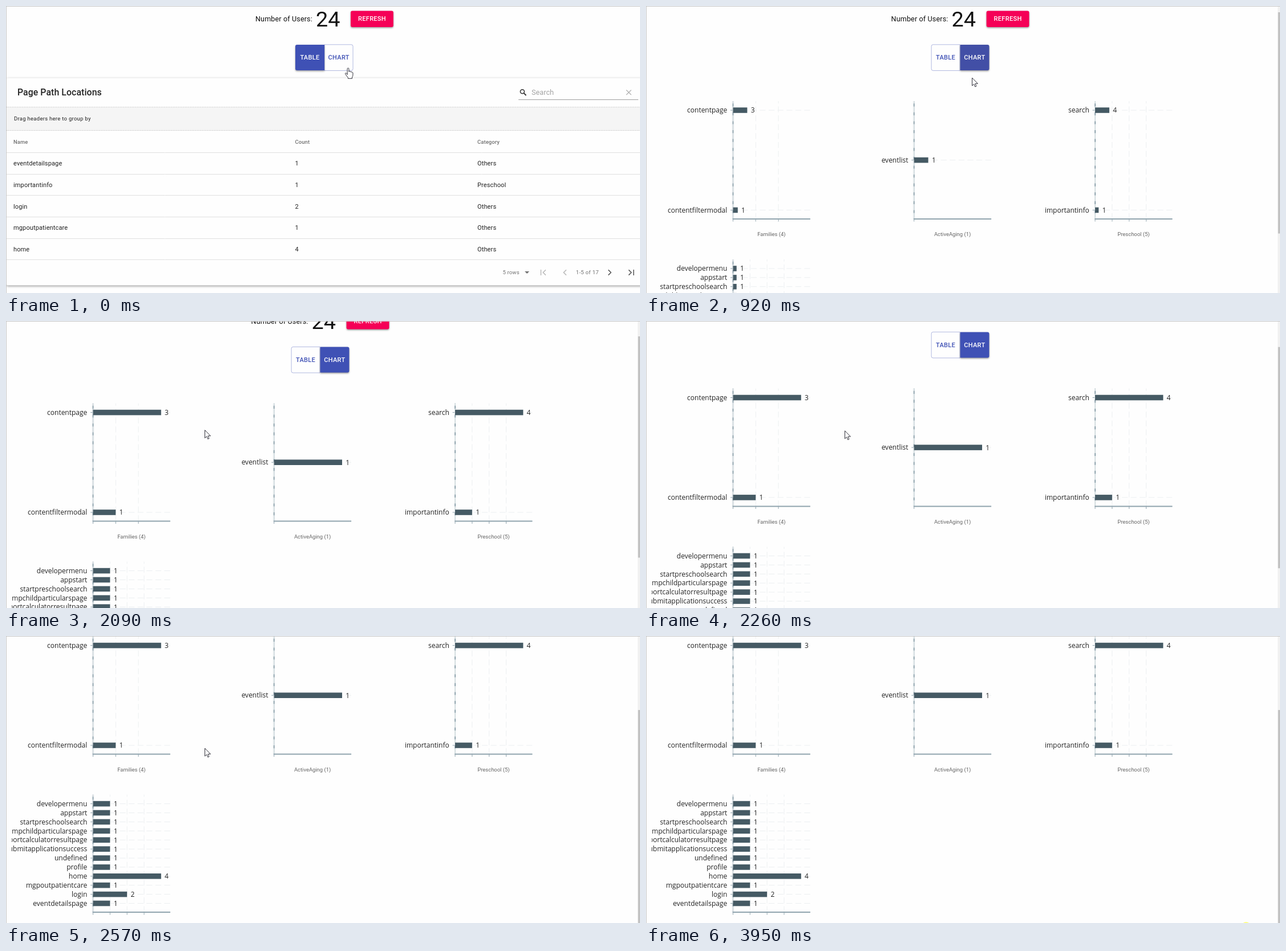
Animation, 1111 px wide and 504 px high, one loop 4030 ms. Source, as an HTML page with a canvas:

```html
<!DOCTYPE html>
<html lang="en">
<head>
<meta charset="utf-8">
<title>Page statistics</title>
<style>
html, body { margin: 0; width: 100%; height: 100%; overflow: hidden; background: #fefefe; }
canvas { display: block; width: 1111px; height: 504px; }
</style>
</head>
<body>
<canvas id="stage"></canvas>
<script>
const W = 1111, H = 504, LOOP = 4030;
const canvas = document.getElementById('stage');
const ctx = canvas.getContext('2d');
const ratio = window.devicePixelRatio || 1;
canvas.width = W * ratio;
canvas.height = H * ratio;

const INDIGO = '#3f51b5', SLATE = '#455a64', AXIS = '#90a4ae', GRID = '#eceff1';
const INK = 'rgba(0,0,0,.87)', SOFT = 'rgba(0,0,0,.56)', FAINT = 'rgba(0,0,0,.27)';
const UI = 'Roboto, sans-serif', LABEL = '"Open Sans", "Noto Sans", sans-serif';

const TICKS = [0, 80, 150, 230, 300, 380, 450, 530, 600, 690, 770, 840, 920, 1010, 1080, 1150,
  1230, 1310, 1390, 1460, 1540, 1620, 2090, 2180, 2280, 2390, 2490, 2570,
  2710, 2790, 2870, 2950, 3030, 3100, 3180, 3260, 3340, 3410, 3490, 3950];

const CURSOR = [[0, 599.5, 109], [80, 598, 107], [300, 588, 97], [600, 586, 98], [690, 584, 103],
  [920, 571, 126], [1010, 562, 130], [1150, 505, 151], [1390, 390, 181], [1620, 348, 190],
  [2090, 348, 191.5], [2390, 348, 195.5], [2570, 348, 197], [2640, 348, 197],
  [2870, 376, 208], [3030, 456.5, 236.5], [3180, 801, 335], [3260, 882, 384], [3410, 968, 435]];
const SCROLL = [[2010, 0], [2090, 22.4], [2390, 109.4], [2570, 166.4]];
const CHART_FILL = [[690, 48, 63, 159], [920, 66, 79, 166], [1230, 63, 81, 181]];

const ROWS = [['eventdetailspage', 1, 'Others'], ['importantinfo', 1, 'Preschool'], ['login', 2, 'Others'],
  ['mgpoutpatientcare', 1, 'Others'], ['home', 4, 'Others']];

const CHARTS = [
  { x: 152.5, top: 167, base: 374, max: 3, ticks: 3, name: 'Families (4)',
    bars: [['contentpage', 3], ['contentfiltermodal', 1]], first: 183, gap: 175.4 },
  { x: 469.7, top: 167, base: 374, max: 1, ticks: 1, name: 'ActiveAging (1)',
    bars: [['eventlist', 1]], first: 270.6, gap: 0 },
  { x: 787, top: 167, base: 374, max: 4, ticks: 4, name: 'Preschool (5)',
    bars: [['search', 4], ['importantinfo', 1]], first: 183, gap: 175.4 },
  { x: 152.5, top: 445, base: 651.5, max: 4, ticks: 4, name: 'Others (15)',
    bars: [['developermenu', 1], ['appstart', 1], ['startpreschoolsearch', 1],
      ['mmpchildparticularspage', 1], ['supportcalculatorresultpage', 1],
      ['submitapplicationsuccess', 1], ['undefined', 1], ['profile', 1], ['home', 4],
      ['mgpoutpatientcare', 1], ['login', 2], ['eventdetailspage', 1]], first: 461, gap: 15.9 }
];

const clamp = v => Math.max(0, Math.min(1, v));
const quadInOut = u => u < .5 ? 2 * u * u : 1 - 2 * (1 - u) * (1 - u);

function track(keys, t) {
  let i = 0;
  while (i < keys.length - 2 && t > keys[i + 1][0]) i++;
  const a = keys[i], b = keys[i + 1], u = clamp((t - a[0]) / (b[0] - a[0]));
  return a.slice(1).map((v, k) => v + (b[k + 1] - v) * u);
}

function text(s, x, y, size, color = INK, o = {}) {
  ctx.font = `${o.weight || 400} ${size}px ${o.font || UI}`;
  ctx.letterSpacing = (o.space || 0) * size + 'px';
  ctx.textAlign = o.align || 'left';
  ctx.fillStyle = color;
  ctx.fillText(s, x, y);
}

function rect(x, y, w, h, color) {
  ctx.fillStyle = color;
  ctx.fillRect(x, y, w, h);
}

function line(pts, color, width = 1, dash = []) {
  ctx.beginPath();
  pts.forEach(([x, y]) => ctx.lineTo(x, y));
  ctx.setLineDash(dash);
  ctx.strokeStyle = color;
  ctx.lineWidth = width;
  ctx.stroke();
  ctx.setLineDash([]);
}

function box(x, y, w, h, r) {
  ctx.beginPath();
  ctx.roundRect(x, y, w, h, r);
}

function raised(x, y, w, h, r, color, blur = 3) {
  ctx.save();
  ctx.shadowColor = 'rgba(0,0,0,.4)';
  ctx.shadowBlur = blur * ratio;
  ctx.shadowOffsetY = 1.5 * ratio;
  box(x, y, w, h, r);
  ctx.fillStyle = color;
  ctx.fill();
  ctx.restore();
}

function outlined(x, r) {
  box(x + .5, 67.8, 50, 45.6, r);
  ctx.fillStyle = '#fefefe';
  ctx.fill();
  ctx.strokeStyle = 'rgba(63,81,181,.5)';
  ctx.lineWidth = .8;
  ctx.stroke();
}

function header(t, chart) {
  const dx = chart ? -7.4 : 0;
  const left = [3, 0, 0, 3], right = [0, 3, 3, 0];
  ctx.save();
  ctx.translate(dx, 0);
  text('Number of Users:', 437, 27, 12.6, '#111', { space: .0094 });
  text('24', 543, 36, 37.8, '#111');
  raised(604, 8.5, 74.8, 28.5, 3, '#f50057');
  const cap = { weight: 500, space: .0286, align: 'center' };
  text('REFRESH', 641.5, 26.4, 11.02, '#fff', cap);
  if (chart) {
    outlined(507, left);
    raised(558, 68, 50.8, 45, right, `rgb(${track(CHART_FILL, t).map(Math.round)})`);
  } else {
    outlined(557.5, right);
    press(t);
    raised(507, 68, 51, 45, left, INDIGO);
  }
  text('TABLE', 532.5, 94.2, 11.02, chart ? INDIGO : '#fff', cap);
  text('CHART', 583.2, 94.2, 11.02, chart ? '#fff' : INDIGO, cap);
  ctx.restore();
}

// Hover tint and ripple on the outlined button.
function press(t) {
  ctx.save();
  box(558, 68, 50, 45, [0, 3, 3, 0]);
  ctx.clip();
  rect(558, 68, 50, 45, `rgba(63,81,181,${.05 * clamp(t / 300)})`);
  const u = clamp((t - 480) / 160);
  if (u > 0) {
    ctx.beginPath();
    ctx.arc(586, 98, 12 + 36 * u, 0, 7);
    ctx.fillStyle = `rgba(63,81,181,${.22 * u})`;
    ctx.fill();
  }
  ctx.restore();
}

function chevron(x, y, dir, color) {
  line([[x - 2.3 * dir, y - 4.6], [x + 2.3 * dir, y], [x - 2.3 * dir, y + 4.6]], color, 1.5);
}

function table() {
  raised(.5, 126.5, 1115, 364, 3, '#fefefe', 4);
  text('Page Path Locations', 20, 157.3, 15.74, INK, { weight: 500, space: .0075 });

  ctx.beginPath();
  ctx.arc(904.8, 150.3, 3.5, 0, 7);
  ctx.strokeStyle = '#333';
  ctx.lineWidth = 1.5;
  ctx.stroke();
  line([[907.4, 152.9], [911.4, 157]], '#333', 1.9);
  text('Search', 921, 156.3, 12.6, '#a3a3a3', { space: .005 });
  line([[1087, 147.5], [1095.6, 156]], '#b0b0b0', 1.2);
  line([[1095.6, 147.5], [1087, 156]], '#b0b0b0', 1.2);
  line([[898, 164.5], [1108, 164.5]], '#949494', .9);

  rect(1, 178, W, 41, '#f5f5f5');
  for (const y of [177.5, 218.5]) line([[1, y], [W, y]], '#cfcfcf', 1, [2, 1]);
  text('Drag headers here to group by', 14, 201, 9.44, INK, { space: .0333 });

  const cols = [13, 506.5, 826];
  ['Name', 'Count', 'Category'].forEach((s, i) =>
    text(s, cols[i], 241.5, 9.44, SOFT, { weight: 500, space: .0107 }));
  line([[1, 257.5], [W, 257.5]], '#e0e0e0');
  ROWS.forEach((row, r) => {
    const y = 276.4 + r * 37.6;
    row.forEach((s, i) => text(s, cols[i], y + 3.9, 11.02, INK, { space: .0107 }));
    const edge = Math.floor(y + 18.8) + .5;
    line([[1, edge], [W, edge]], '#e0e0e0');
  });

  text('5 rows', 870.5, 471.3, 9.44, SOFT, { space: .02 });
  ctx.beginPath();
  [[909, 466], [917, 466], [913, 470]].forEach(p => ctx.lineTo(...p));
  ctx.fillStyle = '#707070';
  ctx.fill();
  line([[937.4, 463], [937.4, 473]], FAINT, 1.5);
  chevron(943.5, 468, -1, FAINT);
  chevron(979.5, 468, -1, FAINT);
  text('1-5 of 17', 998.8, 471.3, 9.44, SOFT, { space: .0333 });
  chevron(1057.8, 468, 1, '#555');
  chevron(1093.5, 468, 1, '#555');
  line([[1099.8, 463], [1099.8, 473]], '#555', 1.5);
}

function chart(c, grow) {
  const end = c.x + 135.4, unit = 119.3 / c.max, dash = [10.4, 5.2];
  const rowY = i => c.first + i * c.gap;
  c.bars.forEach((b, i) => {
    line([[c.x, rowY(i)], [end, rowY(i)]], GRID, 1, dash);
    line([[c.x - 4.5, rowY(i)], [c.x, rowY(i)]], AXIS);
  });
  line([[c.x, c.top], [c.x, c.base]], AXIS, 2);
  for (let k = 0; k < c.ticks; k++) {
    const x = c.x + k * unit;
    line([[x, c.base], [x, c.top]], GRID, k ? 1 : 1.5, dash);
    line([[x, c.base], [x, c.base + 4.5]], AXIS);
  }
  line([[c.x - .8, c.base], [end, c.base]], AXIS, 2);
  c.bars.forEach(([name, n], i) => {
    const y = rowY(i), w = n * unit * grow;
    rect(c.x, y - 4.8, w, 9.6, SLATE);
    text(name, c.x - 10.2, y + 4.2, 12, '#252525', { font: LABEL, align: 'right' });
    text(n, c.x + w + 6.3, y + 4.4, 12, '#252525', { font: LABEL });
  });
  text(c.name, c.x + 67.4, c.base + 30.2, 9.44, '#666', { align: 'center' });
}

function charts(t, scroll) {
  const grow = quadInOut(clamp((t - 597) / 1000));
  ctx.save();
  ctx.beginPath();
  ctx.rect(10, 0, W, 1000);
  ctx.clip();
  CHARTS.forEach(c => chart(c, grow));
  ctx.restore();
}

function scrollbar(scroll) {
  rect(1107, 0, 4, H, '#f1f1f1');
  rect(1107.6, 11 + scroll * .715, 3.4, 388.5, '#c1c1c1');
}

function paintCursor(d, x, y) {
  ctx.save();
  ctx.translate(x, y);
  const p = new Path2D(d);
  ctx.lineJoin = ctx.lineCap = 'round';
  ctx.fillStyle = '#fff';
  ctx.fill(p);
  ctx.strokeStyle = '#30303a';
  ctx.lineWidth = 1;
  ctx.stroke(p);
  ctx.restore();
}

const ARROW = 'M.5.5V14L3.7 11.1 5.7 15.8 7.9 14.9 5.9 10.3H10Z';
const HAND = 'M-1.4 11V1.3Q-1.4 0 0 0T1.4 1.3V6.4Q1.7 5.4 2.8 5.5T4 6.8Q4.4 6 5.4 6.3T6.4 7.5' +
  'Q7 7 7.8 7.5T8.4 9V12.5Q8.3 14.6 7 16V18.3H-.2V16.5Q-2.6 14.2-4.6 10.8-5.6 9-4.4 8.6-3.2 8.4-1.4 11Z';

function cursor(t) {
  if (t >= 3490) return;
  const [x, y] = track(CURSOR, t);
  paintCursor(t < 840 ? HAND : ARROW, x, y);
}

function draw(now) {
  const clock = now % LOOP;
  const t = TICKS.filter(k => k <= clock).pop() || 0;
  const isChart = t >= 690;
  const [scroll] = t < 2090 ? [0] : track(SCROLL, t);

  ctx.setTransform(ratio, 0, 0, ratio, 0, 0);
  rect(0, 0, W, H, '#fefefe');
  ctx.save();
  ctx.translate(0, -scroll);
  header(t, isChart);
  if (isChart) charts(t);
  else table();
  ctx.restore();
  if (isChart) scrollbar(scroll);
  rect(0, 0, W, 1, '#c8c8c8');
  rect(0, 0, 1, H, '#c8c8c8');
  cursor(t);
  if (t >= 3950) {
    ctx.beginPath();
    ctx.arc(1051.5, 510.7, 8.5, 0, 7);
    ctx.fillStyle = '#ffff70';
    ctx.fill();
  }
}

let start;
function loop(now) {
  if (start === undefined) start = now;
  draw(now - start);
  requestAnimationFrame(loop);
}
draw(0);
requestAnimationFrame(loop);
</script>
</body>
</html>
```
